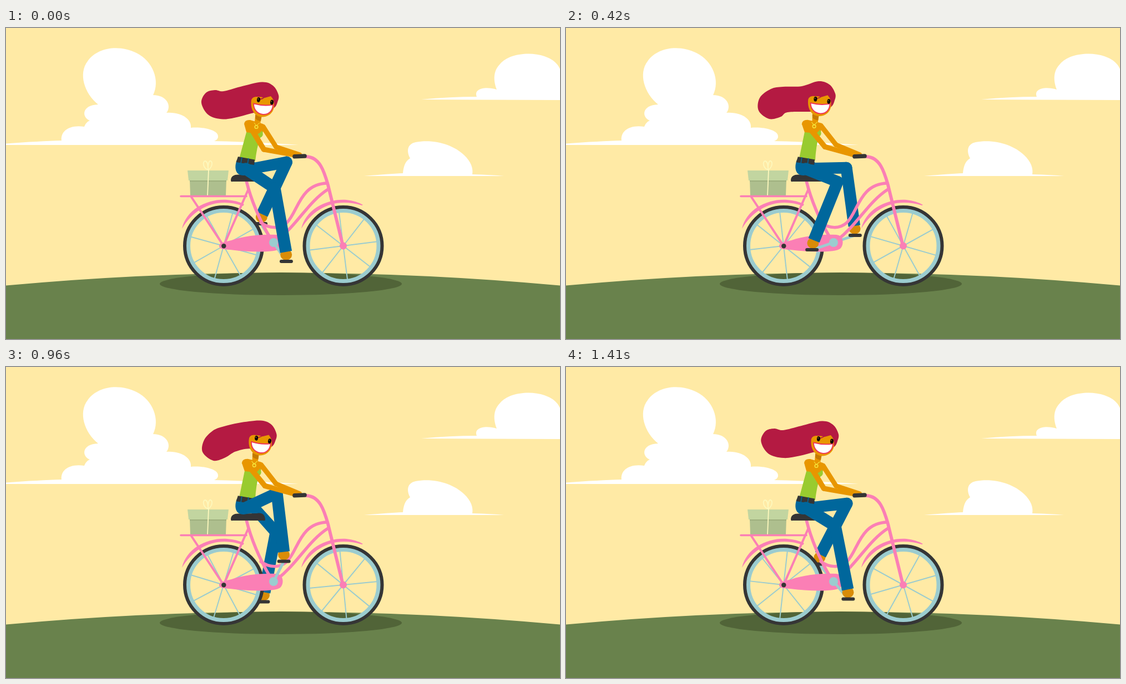
Write an HTML page with a canvas that moves like this. It is 998 px wide and 561 px high and loops after 1440 ms.

```html
<!DOCTYPE html>
<html lang="en">
<head>
<meta charset="utf-8">
<title>Bike ride</title>
<style>
html, body { margin: 0; width: 100%; height: 100%; overflow: hidden; background: #ffeaa5; }
canvas { display: block; }
</style>
</head>
<body>
<canvas id="stage" width="998" height="561"></canvas>
<script>
const ctx = document.getElementById('stage').getContext('2d');
const LOOP = 1440, STEP = 30, TURN = 1434, SWAY = TURN / 2, RAD = Math.PI / 180;
const C = {
  sky: '#ffeaa5', hill: '#69824c', shade: '#516438', pink: '#fb7fb5', metal: '#9bcccf',
  dark: '#353535', skin: '#e89600', shoe: '#d98c08', neck: '#c47a00', jeans: '#00679c',
  top: '#99cb2f', hair: '#b41a42', lip: '#f0305a', lid: '#c2d5a0', box: '#aebf8e',
  fold: '#9eaf7e', ribbon: '#fdf8bd', gold: '#f5e53b'
};

// Upper-body poses: lean and nod in degrees, then the loose hair from jaw to crown.
const poses = [
  { at: 0, v: [0, 0, 446,153, 420,160, 391,164.5, 365,157, 352,135, 360,117, 376,112, 392,114, 422,106] },
  { at: 270, v: [-3.8, 5.8, 437,147, 412,152, 395,163, 374,169.5, 354,155, 356,133, 372,115, 391,107, 420,100.5] },
  { at: 420, v: [-3.6, 2.6, 437,151, 399,152, 387,160, 366,164, 347,149, 349,126, 369,110, 391,106, 425,105] },
  { at: 630, v: [-0.8, 0.3, 443,155, 420,159.5, 394,162, 364,156, 349,135, 355,115, 371,108, 388,112, 428,106] }
];
const crown = [[461,97.5], [481,104], [491,121], [489,134], [483,144], [465,152]];
const waist = [432, 240], nape = [455, 160], crank = [482, 387];

// Each length is a mean plus a swing that follows the pedal height.
const nearLeg = { hip: [430, 250], root: [432, 254], rootR: 10.8, thigh: [64.5, 2.5], shin: [112, 6] };
const farLeg = { hip: [438, 258], root: [446, 253], rootR: 10, thigh: [66, -4], shin: [107, 4] };

const clouds = [
  'M0,208.5Q60,204 100,203C98,186 114,174 141,178C143,173 146,169 151,167C136,161 136,139 166,138C141,118 130,82 147,60C165,34 205,30 235,45C265,60 278,95 265,121C290,121 299,141 289,153C318,151 335,166 333,180C355,178 384,184 382,197Q381,202 375,204Q460,206 527,211L0,211Z',
  'M748,129Q800,124 848,124C842,109 864,105 884,111C876,90 880,75 890,65C905,46 945,42 970,51Q991,58 998,74V130Z',
  'M645,267Q690,263 715,262C716,252 718,241 728,235C721,222 723,209 738,206C772,200 806,211 825,229C838,241 842,254 840,264Q875,265 897,267Z'
].map(d => new Path2D(d));

function fill(shape, color) {
  ctx.fillStyle = color;
  ctx.fill(typeof shape === 'string' ? new Path2D(shape) : shape);
}
function stroke(d, color, width, cap = 'round') {
  ctx.strokeStyle = color;
  ctx.lineWidth = width;
  ctx.lineCap = cap;
  ctx.stroke(new Path2D(d));
}
function oval(x, y, rx, ry, color, turn = 0) {
  ctx.beginPath();
  ctx.ellipse(x, y, rx, ry, turn, 0, 7);
  ctx.fillStyle = color;
  ctx.fill();
}
function ring(x, y, r, width, color) {
  ctx.beginPath();
  ctx.arc(x, y, r, 0, 7);
  ctx.strokeStyle = color;
  ctx.lineWidth = width;
  ctx.stroke();
}
function turn([x, y], [px, py], deg) {
  const c = Math.cos(deg * RAD), s = Math.sin(deg * RAD);
  return [px + (x - px) * c - (y - py) * s, py + (x - px) * s + (y - py) * c];
}
function spin([x, y], deg) {
  ctx.translate(x, y);
  ctx.rotate(deg * RAD);
  ctx.translate(-x, -y);
}
// Tapered limb segment; the far end is round unless flat is set.
function limb([x1, y1], [x2, y2], r1, r2, color, flat) {
  const a = Math.atan2(y2 - y1, x2 - x1), h = Math.PI / 2;
  ctx.beginPath();
  ctx.arc(x1, y1, r1, a + h, a - h);
  if (flat) {
    ctx.lineTo(x2 + r2 * Math.sin(a), y2 - r2 * Math.cos(a));
    ctx.lineTo(x2 - r2 * Math.sin(a), y2 + r2 * Math.cos(a));
  } else {
    ctx.arc(x2, y2, r2, a - h, a + h);
  }
  ctx.fillStyle = color;
  ctx.fill();
}
function smoothShape(pts, color) {
  const n = pts.length, p = i => pts[(i + n) % n];
  ctx.beginPath();
  ctx.moveTo(...p(0));
  for (let i = 0; i < n; i++) {
    const [a, b, c, d] = [p(i - 1), p(i), p(i + 1), p(i + 2)];
    ctx.bezierCurveTo(b[0] + (c[0] - a[0]) / 6, b[1] + (c[1] - a[1]) / 6,
      c[0] - (d[0] - b[0]) / 6, c[1] - (d[1] - b[1]) / 6, c[0], c[1]);
  }
  ctx.fillStyle = color;
  ctx.fill();
}

// Cyclic cubic interpolation between the poses.
function poseAt(time) {
  const n = poses.length;
  const key = i => ({ at: poses[(i + n) % n].at + Math.floor(i / n) * SWAY, v: poses[(i + n) % n].v });
  let i = n - 1;
  while (poses[i].at > time) i--;
  const [a, b, c, d] = [key(i - 1), key(i), key(i + 1), key(i + 2)];
  const span = c.at - b.at, u = (time - b.at) / span, u2 = u * u, u3 = u2 * u;
  return b.v.map((y, k) => {
    const m1 = (c.v[k] - a.v[k]) / (c.at - a.at) * span;
    const m2 = (d.v[k] - y) / (d.at - b.at) * span;
    return (2 * u3 - 3 * u2 + 1) * y + (u3 - 2 * u2 + u) * m1 +
      (3 * u2 - 2 * u3) * c.v[k] + (u3 - u2) * m2;
  });
}

function drawScene() {
  ctx.fillStyle = C.sky;
  ctx.fillRect(0, 0, 998, 561);
  clouds.forEach(c => fill(c, '#fff'));
  oval(499, 441.5 + 5400, 5400, 5400, C.hill);
  oval(495, 461.5, 218, 20.5, C.shade);
}

function drawWheel(x, y, angle) {
  ctx.strokeStyle = C.metal;
  ctx.lineWidth = 2;
  ctx.beginPath();
  for (let i = 0; i < 8; i++) {
    const a = (angle + i * 45) * RAD;
    ctx.moveTo(x, y);
    ctx.lineTo(x + 62 * Math.cos(a), y + 62 * Math.sin(a));
  }
  ctx.stroke();
  ring(x, y, 64, 8, C.metal);
  ring(x, y, 70, 6, C.dark);
}

function drawParcel() {
  fill('M331,274H397L396,302H332Z', C.box);
  fill('M331,274H397V277H331Z', C.fold);
  fill('M327,257H401L399,275H329Z', C.lid);
  stroke('M365,256L363,302M364,256C354,252 354,240 359,240C364,241 364,250 364,256C363,246 366,238 369,240C373,243 371,252 364,256', C.ribbon, 1.8);
}

function drawFrame() {
  stroke('M315,303.5H433', C.pink, 3.6);
  stroke('M334,305L392,393L437,290', C.pink, 4);
  fill('M317,362C325,327 362,308 398,310Q416,311 429,318L427,321Q410,315 394,315C362,315 334,333 317,362Z', C.pink);
  fill('M532,362C540,327 577,308 613,310Q631,312 643,319L641,320Q625,315 609,315C577,315 549,333 532,362Z', C.pink);
  stroke('M433,276C441,308 455,343 476,379', C.pink, 5.5);
  stroke('M459,351C474,362 493,363 506,351C526,332 529,281 579,280', C.pink, 5.5);
  stroke('M487,384C527,353 543,315 580,291', C.pink, 5.5);
  stroke('M541,232C565,233 573,258 580,283L607,393', C.pink, 5.8);
  oval(607.5, 393, 6.5, 6.5, C.pink);
  fill('M384,393C384,387 394,386 406,383C432,374 462,372 487,373C501,374 501,392 494,398C486,405 440,405 404,400C392,399 384,399 384,393Z', C.pink);
  oval(392.3, 393.3, 4.2, 4.2, C.dark);
  fill('M405,275C405,267 411,264 420,264.5L452,264C463,262 467,268 467,276Q466,278 463,277H408Q405,278 405,275Z', C.dark);
}

// The knee is solved from the hip joint and the pedal; root is where the thigh is drawn.
function drawLeg(deg, leg) {
  const s = Math.sin(deg * RAD), c = Math.cos(deg * RAD);
  const pedal = [crank[0] + 41 * c, crank[1] + 41 * s];
  const ankle = [pedal[0] + 1 - 2.7 * c, pedal[1] - 17];
  const [thigh, shin] = [leg.thigh, leg.shin].map(([mean, swing]) => mean + swing * s);
  const [hx, hy] = leg.hip;
  const dx = ankle[0] - hx, dy = ankle[1] - hy, d = Math.hypot(dx, dy);
  const along = (thigh * thigh - shin * shin + d * d) / (2 * d);
  const out = Math.sqrt(Math.max(0, thigh * thigh - along * along));
  const knee = [hx + (dx * along + dy * out) / d, hy + (dy * along - dx * out) / d];
  stroke(`M${crank}L${pedal}`, C.metal, 5);
  oval((ankle[0] + pedal[0]) / 2, pedal[1] - 12, 10.5, 10, C.shoe);
  stroke(`M${pedal[0] - 9},${pedal[1]}h18`, C.dark, 6);
  limb(leg.root, knee, leg.rootR, 10.5, C.jeans);
  limb(knee, ankle, 10.5, 10.8, C.jeans, true);
}

function drawArm(shoulder, elbow, hand, r) {
  limb(shoulder, elbow, r, r - 0.3, C.skin);
  limb(elbow, hand, r - 0.3, 3.8, C.skin);
}

function drawHips() {
  fill('M416,238C411,250 412,266 428,266L446,263L455,252L448,242Z', C.jeans);
}

function drawTorso(lean) {
  ctx.save();
  spin(waist, lean);
  fill('M429,173Q430,165 440,166L450,169L463,173Q466,184 460,193L434,191Z', C.skin);
  fill('M433,188L446,190Q453,195 461,185Q466,194 458,198Q452,214 449,240L420,236Z', C.top);
  ctx.restore();
  ctx.save();
  spin(waist, lean / 3);
  fill('M418,232L448,237.5L447,247L414.5,242Z', C.dark);
  stroke('M425,233L423,244M437,235L435,246', C.jeans, 1.6, 'butt');
  ctx.restore();
}

function drawHead(lean, nod, loose) {
  const strands = [];
  for (let i = 0; i < loose.length; i += 2) strands.push([loose[i], loose[i + 1]]);
  const dome = crown.map(p => turn(turn(p, nape, nod), waist, lean));
  smoothShape(strands.concat(dome), C.hair);

  ctx.save();
  spin(waist, lean);
  stroke('M454.5,156L453,172', C.skin, 10.5, 'butt');
  fill('M449,157H461L459,168Q452,167 449,163Z', C.neck);
  stroke('M447,171L451,176L457,171', C.gold, 1);
  ring(451, 178.5, 2.8, 1.6, C.gold);
  spin(nape, nod);
  fill('M441.5,134Q441,125 450,124L460,124.5L466,126L477,123Q484,130 483,142C481,155 471,160.5 461,160.5C449,160 441,149 441.5,134Z', C.skin);
  stroke('M458,128.5Q463,127.5 467,123.5', C.hair, 1.8);
  const mouth = 'M447,137.5Q463,142 480,139.5C479,149 473,155.5 463,155C453,154 447,146 447,137.5Z';
  stroke(mouth, C.lip, 3.6);
  fill(mouth, '#fff');
  oval(455, 129.5, 3, 4.4, '#0d0905', 0.1);
  oval(479, 134, 3, 4.4, '#0d0905', 0.1);
  oval(454.3, 128, 0.7, 0.9, '#c98a20');
  oval(478.3, 132.5, 0.7, 0.9, '#c98a20');
  ctx.restore();
}

function draw(t) {
  const [lean, nod, ...loose] = poseAt(t % SWAY);
  const back = -lean / 3.8, travel = 360 * t / TURN;
  const pedalAngle = 56 + travel, wheelAngle = 15.4 + travel * 1.5;
  const shoulder = p => turn(p, waist, lean);

  drawScene();
  drawArm(shoulder([463, 178]), [486.5, 214.5 - 4 * back], [529, 228], 4.6);
  drawLeg(pedalAngle + 180, farLeg);
  drawWheel(392, 393, wheelAngle);
  drawWheel(607.5, 393, wheelAngle - 22.5);
  drawParcel();
  drawFrame();
  drawHips();
  drawTorso(lean);
  oval(crank[0], crank[1], 8, 8, C.metal);
  drawLeg(pedalAngle, nearLeg);
  drawHead(lean, nod, loose);
  drawArm(shoulder([437, 174]), [464.5 + 2 * back, 219 - 5 * back], [519, 229.5], 5);
  stroke('M520,231.8L538,231', C.dark, 7.6);
}

function frame(now) {
  draw(Math.floor((now % LOOP) / STEP) * STEP);
  requestAnimationFrame(frame);
}
draw(0);
requestAnimationFrame(frame);
</script>
</body>
</html>
```
